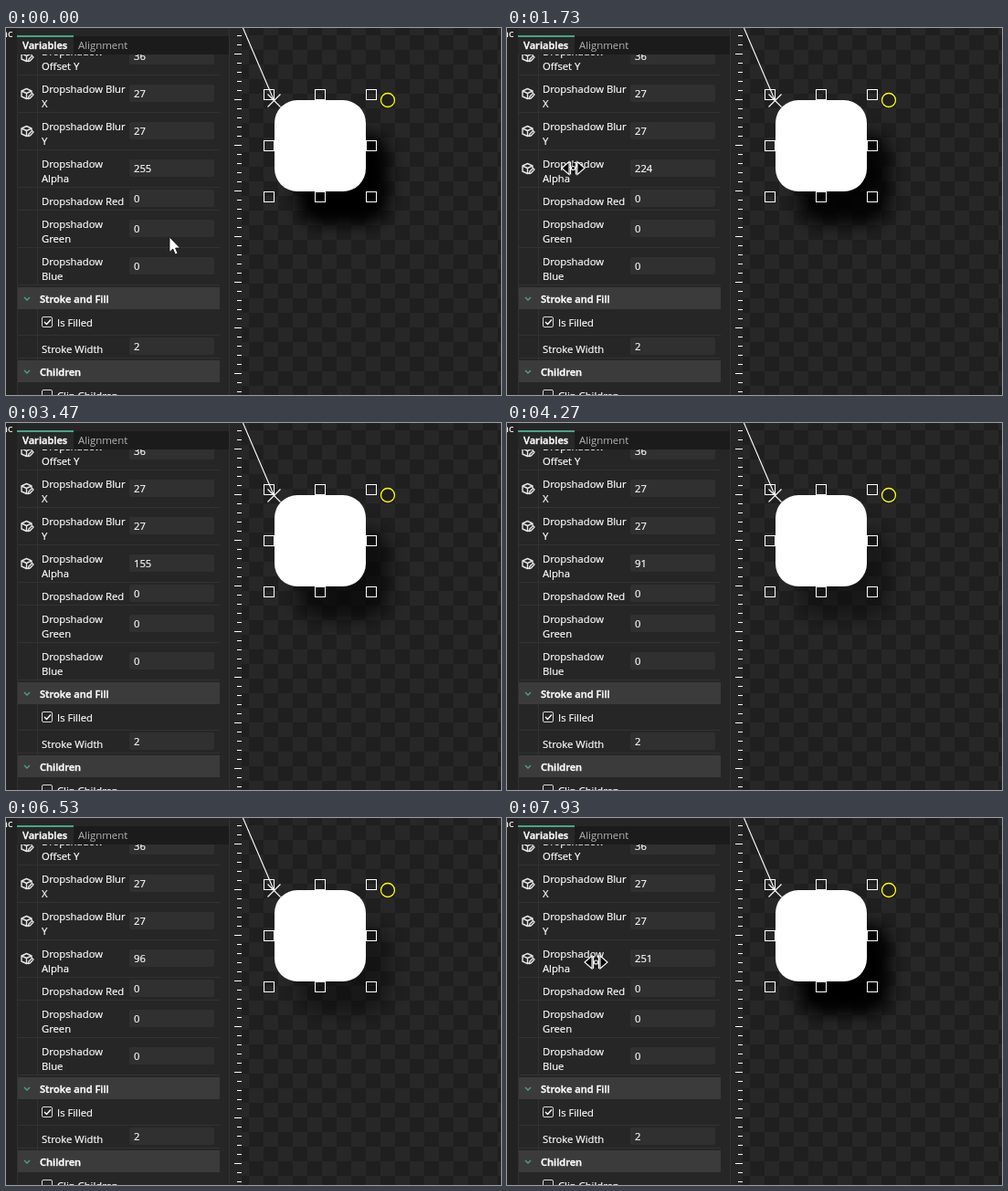
These frames come from a looping animation (542x402 px, 8000 ms). An HTML page:

```html
<!DOCTYPE html>
<html lang="en">
<head>
<meta charset="utf-8">
<title>Dropshadow alpha</title>
<style>
  html, body { margin: 0; width: 100%; height: 100%; overflow: hidden; background: #262626; }
  svg { display: block; width: 542px; height: 402px; }
  text { font: 11.25px "Open Sans", "Noto Sans", sans-serif; fill: #fff; stroke: #fff; stroke-width: .2; white-space: pre; }
  .head { font-size: 11.1px; font-weight: 600; stroke-width: .35; }
  .muted { font-size: 11.4px; fill: #b4b4b4; stroke: none; }
  .rule { stroke: #323232; fill: none; }
  .field { fill: #303030; }
  .bar { fill: #3b3b3b; }
  .accent { stroke: #49a58a; fill: none; stroke-width: 1.3; }
  .line { stroke: #fff; fill: none; }
  .box { stroke: #d8d8d8; fill: none; }
</style>
</head>
<body>
<svg viewBox="0 0 542 402">
  <defs>
    <pattern id="checker" x="250" y="-8" width="32" height="32" patternUnits="userSpaceOnUse">
      <rect width="32" height="32" fill="#1f1f1f"/>
      <path d="M0 0h16v16H0zM16 16h16v16H16z" fill="#272727"/>
    </pattern>
    <filter id="blur" x="-40%" y="-40%" width="180%" height="180%"><feGaussianBlur stdDeviation="8.5"/></filter>
    <clipPath id="list"><rect x="12" y="29" width="223" height="373"/></clipPath>
    <g id="cube" fill="none" stroke="#e6e6e6" stroke-width="1.4" stroke-linejoin="round">
      <path d="M5 -1V-3L-.5 -5.5L-6 -3V3L-.5 5.5L1 5M-6 -3L-.5 -.5L5 -3M-.5 -.5V5.5"/>
      <path d="M1.500 5.500L2 3L5.500 -.5L7 1L3.500 4.800Z"/>
    </g>
  </defs>

  <rect width="542" height="402" fill="#262626"/>
  <rect width="12" height="402" fill="#222"/>
  <rect x="12" y="9" width="232" height="20" fill="#1b1b1b"/>
  <rect x="12" y="9" width="62" height="20" fill="#282828"/>
  <path d="M12 9h62" class="accent" style="stroke-width:2"/>
  <text x="-5" y="10">nc</text>
  <text x="18" y="23" class="head">Variables</text>
  <text x="79" y="23" class="muted">Alignment</text>
  <path d="M12.500 29V402M244.500 0V402" class="rule"/>
  <g id="rows" clip-path="url(#list)"></g>

  <rect x="258" width="284" height="402" fill="url(#checker)"/>
  <g id="ruler" class="line"></g>
  <rect id="shadow" x="319" y="115" width="100" height="100" rx="25" filter="url(#blur)"/>
  <rect x="294" y="79" width="100" height="100" rx="25" fill="#fff"/>
  <path d="M259.500 0L293.500 79.500M286.500 72.500l14 14M300.500 72.500l-14 14" class="line" stroke-width="1.1"/>
  <g id="handles" class="line"></g>
  <circle cx="418" cy="79" r="7.500" fill="none" stroke="#ff0" stroke-width="1.300"/>

  <path id="arrow" d="M0 0V16.500L3.800 13L6.300 19L9 17.800L6.500 12H11.500Z" fill="#fff" stroke="#111" stroke-width=".8"/>
  <g id="resize" fill="#000" stroke="#fff" stroke-width="1.100">
    <path d="M-12.500 0L-4.500 -7V7ZM12.500 0L4.500 -7V7Z"/>
    <path d="M-3 -7V7M3 -7V7" fill="none"/>
    <path d="M0 -6V6" stroke="#000"/>
    <circle r="2"/>
  </g>
</svg>
<script>
const $ = id => document.getElementById(id);
const LOOP = 8000, STEP = LOOP / 120;

const label = (x, y, s, cls = "") => `<text x="${x}" y="${y}" class="${cls}">${s}</text>`;
const rule = y => `<path d="M12 ${y + .5}H234" class="rule"/>`;
const check = (y, s, on) =>
  `<rect x="39.5" y="${y + .5}" width="11" height="11" rx="1.5" class="box"/>` +
  (on ? `<path d="M42 ${y + 6}l2.5 2.5l4.5 -5" class="line" stroke-width="1.3"/>` : "") +
  label(56, y + 11, s);
const section = (y, s) =>
  rule(y - 3) + `<rect x="13" y="${y}" width="221" height="24" class="bar"/>` +
  `<path d="M20 ${y + 11}l3 3l3 -3" class="accent"/>` + label(37, y + 17, s, "head");

// One property row: [top, label lines, value, has icon]
const row = ([top, lines, value, icon]) => {
  const height = lines.length > 1 ? 41 : 25;
  const field = top + (height - 19) / 2;
  return rule(top) +
    `<rect x="135" y="${field}" width="93" height="19" rx="2" class="field"/>` +
    lines.map((s, i) => label(39, top + 20 + 16 * i, s)).join("") +
    `<text x="140" y="${field + 14}" id="v${top}">${value}</text>` +
    (icon ? `<use href="#cube" x="23" y="${top + 21}" id="i${top}"/>` : "");
};

const ALPHA_TOP = 133;
$("rows").innerHTML = `<path d="M34.5 29V281M34.5 308V364" class="rule"/>` + [
  [10, ["Dropshadow", "Offset Y"], 36, true],
  [51, ["Dropshadow Blur", "X"], 27, true],
  [92, ["Dropshadow Blur", "Y"], 27, true],
  [ALPHA_TOP, ["Dropshadow", "Alpha"], 255, true],
  [174, ["Dropshadow Red"], 0],
  [199, ["Dropshadow", "Green"], 0],
  [240, ["Dropshadow", "Blue"], 0],
  [336, ["Stroke Width"], 2]
].map(row).join("") + section(284, "Stroke and Fill") + check(316, "Is Filled", true) +
  section(364, "Children") + check(396, "Clip Children", false);

let ticks = "";
for (let y = 8; y < 402; y += 10) ticks += `M${y % 50 === 28 ? 250 : 253} ${y + .5}H258`;
$("ruler").innerHTML = `<path d="${ticks}"/>`;

for (const x of [288, 344, 400])
  for (const y of [73, 129, 185])
    if (x !== 344 || y !== 129)
      $("handles").innerHTML += `<rect x="${x - 5.5}" y="${y - 5.5}" width="11" height="11"/>`;

// Piecewise linear value of [time, value] keys
function track(keys, t) {
  const i = keys.findIndex(k => k[0] > t);
  if (i < 0) return keys[keys.length - 1][1];
  if (i === 0) return keys[0][1];
  const [t0, a] = keys[i - 1], [t1, b] = keys[i];
  return a + (b - a) * (t - t0) / (t1 - t0);
}

const alphaKeys = [[667, 255], [733, 254], [1067, 246], [2400, 201], [3467, 155], [4130, 98],
  [5133, 50], [5600, 24], [6000, 24], [6533, 96], [7733, 247], [7933, 251]];
const heightKeys = [[2400, 153.5], [3140, 159], [7175, 164], [7733, 159], [7933, 158]];

const alphaText = $("v" + ALPHA_TOP), alphaIcon = $("i" + ALPHA_TOP);
const show = (el, on) => el.setAttribute("visibility", on ? "visible" : "hidden");
const place = (el, x, y) => el.setAttribute("transform", `translate(${x} ${y})`);

function draw(time) {
  const t = Math.floor((time % LOOP + 4) / STEP) * STEP;
  const alpha = Math.round(track(alphaKeys, t));
  const returning = t > 5800;
  let x = alpha - (returning ? 153.5 : 151.5);
  let y = track(heightKeys, t);
  if (t < 400) {
    x = track([[0, 179], [400, 103.5]], t);
    y = track([[0, 229], [400, 153.5]], t);
  }
  const pointing = t < 400 && x > 133;
  show($("arrow"), pointing);
  show($("resize"), !pointing && x >= (returning ? 23 : 17));
  place($("arrow"), x, y);
  place($("resize"), x, y);
  show(alphaIcon, t > 700);
  alphaText.textContent = alpha;
  $("shadow").setAttribute("opacity", alpha / 255);
}

const start = performance.now();
function tick() {
  draw(performance.now() - start);
  requestAnimationFrame(tick);
}
tick();
</script>
</body>
</html>
```
